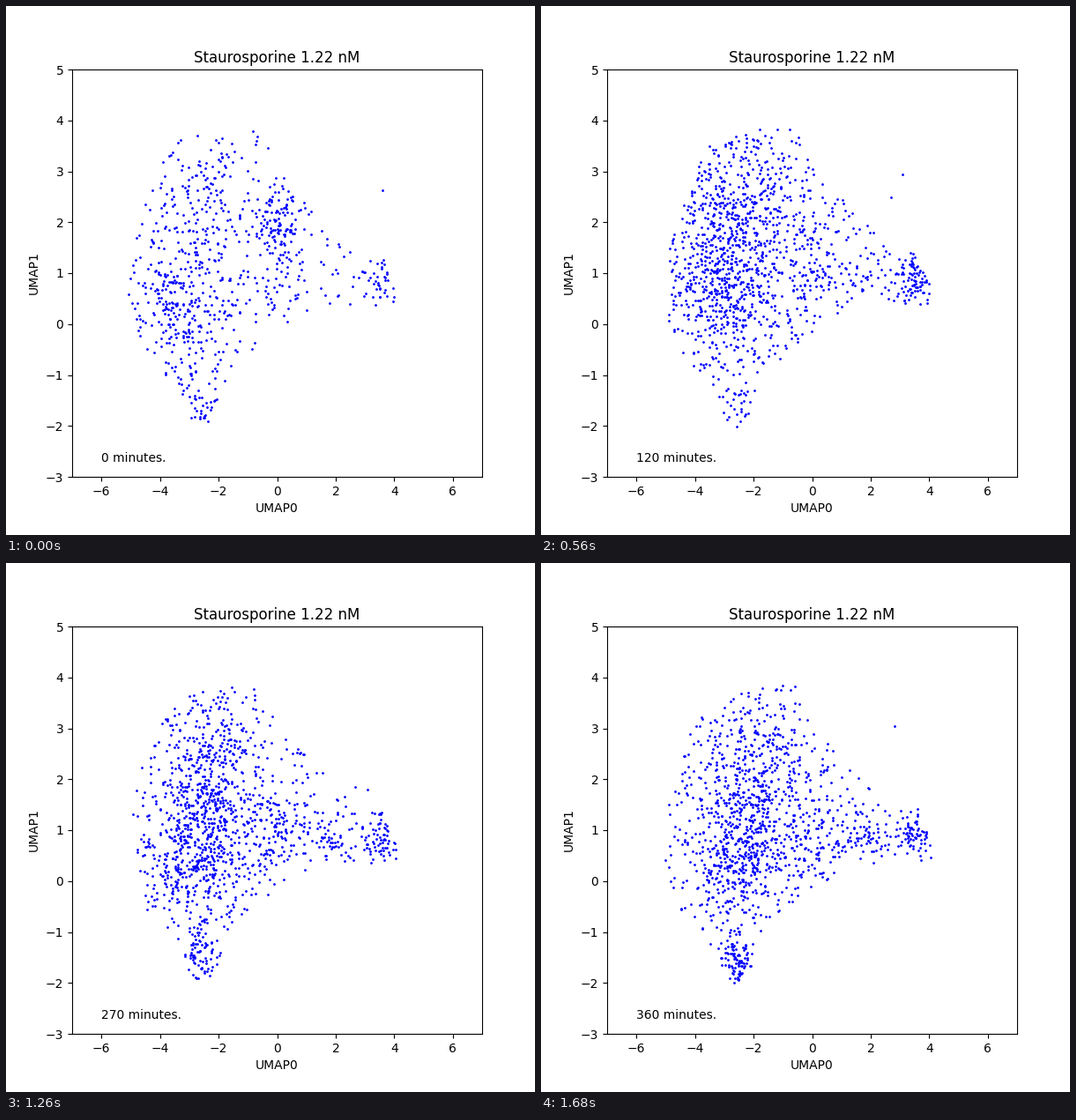
A matplotlib script that plays this animation: 600 by 600 pixels, repeating every 1.82 s.

```python
import numpy as np
import matplotlib.pyplot as plt
from matplotlib.animation import FuncAnimation
from matplotlib.path import Path

FRAMES, INTERVAL, STEP_MIN = 13, 140, 30

# Corners of the region that the cells fill.
OUTLINE = Path([
    (-5.1, 0.5), (-4.8, 1.95), (-4.0, 3.15), (-3.3, 3.65), (-2.2, 3.82),
    (-0.6, 3.85), (0.1, 2.95), (2.2, 1.8), (2.7, 1.35), (3.6, 1.42),
    (4.25, 0.4), (1.2, 0.3), (-0.6, -0.4), (-1.7, -1.0), (-2.2, -1.9),
    (-2.6, -2.06), (-2.95, -1.85), (-3.3, -1.35), (-4.6, -0.5),
])
LOW, HIGH = OUTLINE.vertices.min(0), OUTLINE.vertices.max(0)


def clusters(i):
    """Share, centre and spread of each dense group at step i."""
    t = i / (FRAMES - 1)
    early = np.exp(-1.2 * i)
    return [
        (0.28 - 0.14 * early, (-2.6 + 0.5 * t, 2.2 - 0.3 * t), (0.9, 0.8)),
        (0.25, (-3.5 + t, 0.8 - 0.4 * t - 0.5 * early), (0.9, 0.6)),
        (0.13 * early, (0.0, 2.1), (0.4, 0.35)),
        (0.06, (0.0, 1.0), (0.6, 0.45)),
        (0.05 * t, (1.8, 0.9), (0.7, 0.22)),
        (0.04, (3.6, 0.88), (0.32, 0.27)),
        (0.04 * early + 0.06 * t, (-2.6, -1.55), (0.28, 0.35)),
    ]


def inside(draw, n):
    """First n drawn points that fall within the outline."""
    pts = draw((6 * n + 60, 2))
    return pts[OUTLINE.contains_points(pts)][:n]


def cells(i):
    rng = np.random.default_rng(122 + i)
    total = 1330 - 550 * np.exp(-i)
    groups = clusters(i)
    spread = 1 - sum(share for share, *_ in groups)
    parts = [inside(lambda size: rng.uniform(LOW, HIGH, size),
                    round(total * spread))]
    for share, centre, sigma in groups:
        parts.append(inside(lambda size: rng.normal(centre, sigma, size),
                            round(total * share)))
    strays = rng.normal((2.8, 2.4), (0.3, 0.4), (rng.integers(1, 4), 2))
    return np.vstack(parts + [strays])


fig, ax = plt.subplots(figsize=(6, 6), dpi=100)
ax.set(xlim=(-7, 7), ylim=(-3, 5), xlabel="UMAP0", ylabel="UMAP1",
       title="Staurosporine 1.22 nM")
dots, = ax.plot([], [], "o", color="blue", markersize=1)
label = ax.text(-6, -2.7, "")


def update(i):
    dots.set_data(*cells(i).T)
    label.set_text(f"{i * STEP_MIN} minutes.")
    return dots, label


anim = FuncAnimation(fig, update, frames=FRAMES, interval=INTERVAL,
                     repeat=True, repeat_delay=0)
plt.show()
```
